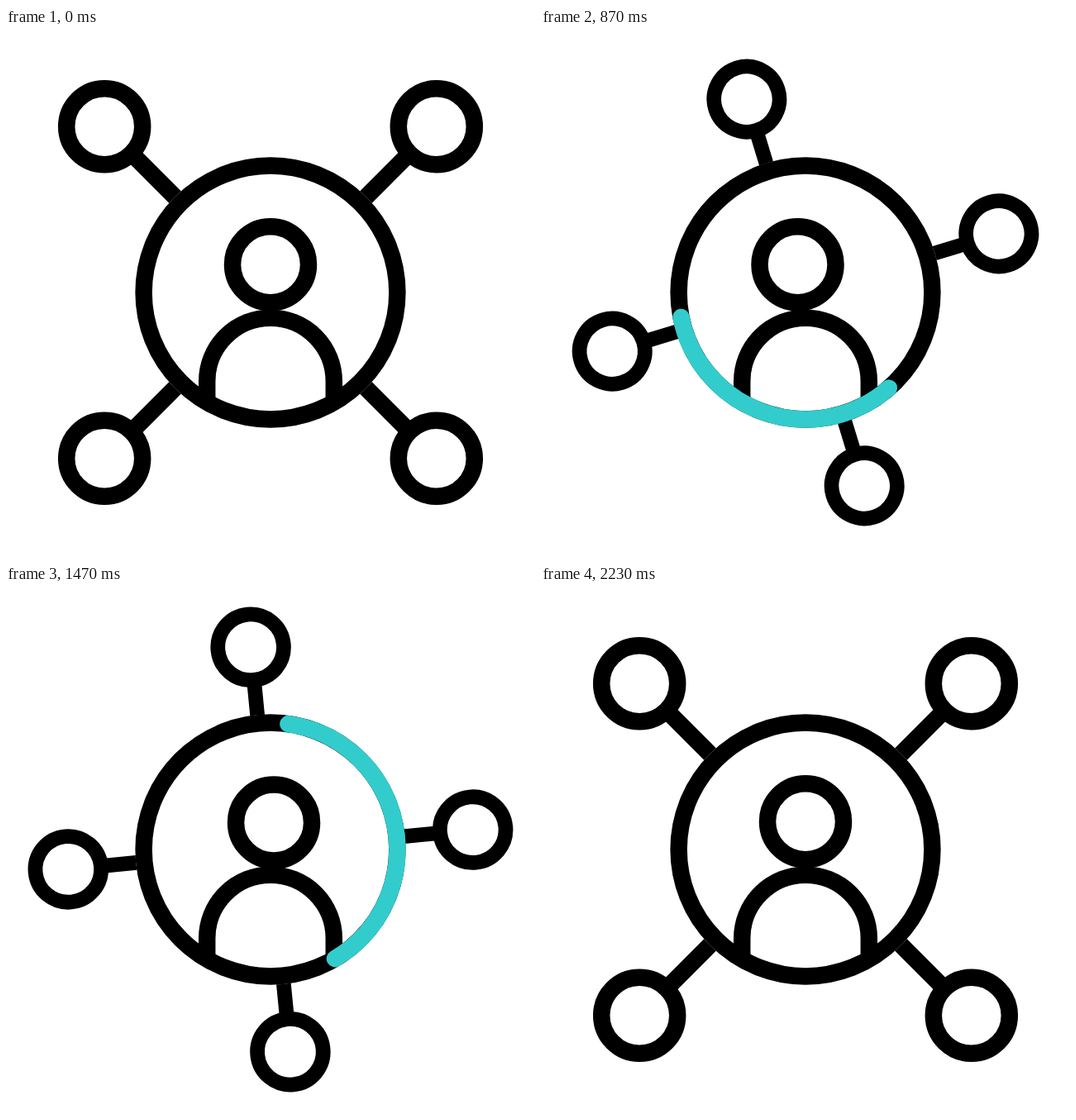
These frames come from a looping animation (640x640 px, 2.5 s). An HTML page:

```html
<!DOCTYPE html>
<html lang="en">
<head>
<meta charset="utf-8">
<title>Network hub</title>
<style>
  html, body { margin: 0; width: 100%; height: 100%; overflow: hidden; background: #fff; }
  svg { display: block; width: 100%; height: 100%; fill: none; stroke: #000; stroke-width: 20.5; }
</style>
</head>
<body>
<svg viewBox="-320 -320 640 640">
  <defs>
    <g id="arm">
      <path d="M150 0H238.5"/>
      <circle cx="284" r="46"/>
    </g>
  </defs>
  <g id="arms">
    <use href="#arm" transform="rotate(45)"/>
    <use href="#arm" transform="rotate(135)"/>
    <use href="#arm" transform="rotate(225)"/>
    <use href="#arm" transform="rotate(315)"/>
  </g>
  <circle r="163.6" fill="#fff" stroke="none"/>
  <path d="M-76.8 133V107.5A76.8 76.8 0 0 1 76.8 107.5V133"/>
  <circle id="head" cy="-33.8" r="46"/>
  <circle r="153.4"/>
  <path id="sweep" stroke="#3cc" stroke-linecap="round"/>
</svg>
<script>
const LOOP = 2500, FPS = 30, RADIUS = 153.4;
const SWEEP_FROM = 15.5, SWEEP_TURN = 472.5;
const arms = document.getElementById("arms");
const head = document.getElementById("head");
const sweep = document.getElementById("sweep");

// Cubic-bezier(x1, 0, x2, 1), solved by bisection
function ease(u, x1, x2) {
  let lo = 0, hi = 1;
  for (let i = 0; i < 30; i++) {
    const p = (lo + hi) / 2, q = 1 - p;
    const x = 3 * q * q * p * x1 + 3 * q * p * p * x2 + p * p * p;
    if (x < u) lo = p; else hi = p;
  }
  return lo * lo * (3 - 2 * lo);
}

// 0 before step a, 1 after step b
function ramp(k, a, b, x1 = 0.53, x2 = 0.47) {
  if (k <= a) return 0;
  if (k >= b) return 1;
  return ease((k - a) / (b - a), x1, x2);
}

// Rises from a to b and falls back by c
const bump = (k, a, b, c) => ramp(k, a, b) - ramp(k, b, c);

function point(deg) {
  const r = deg * Math.PI / 180;
  return `${(RADIUS * Math.cos(r)).toFixed(2)} ${(RADIUS * Math.sin(r)).toFixed(2)}`;
}

function arc(from, to) {
  if (to - from < 0.3) return "";
  const large = to - from > 180 ? 1 : 0;
  return `M${point(from)}A${RADIUS} ${RADIUS} 0 ${large} 1 ${point(to)}`;
}

function draw(ms) {
  // Steps change on whole hundredths of a second.
  const k = Math.floor((Math.floor(ms / 10) * 10 + 5) * FPS / 1000);

  const turn = 180 * ramp(k, 8, 67);
  const size = 1 - 0.15 * (ramp(k, 8, 31) - ramp(k, 36, 67));
  arms.setAttribute("transform", `rotate(${turn}) scale(${size})`);

  const right = bump(k, 40, 49, 58);
  const x = 10.5 * right - 9.5 * bump(k, 14, 26, 40);
  const y = 3.4 * bump(k, 26, 40, 49) - 2.2 * right;
  head.setAttribute("transform", `translate(${x} ${y})`);

  const lead = ramp(k, 12.4, 52.7, 0.167, 0.777);
  const trail = ramp(k, 16.5, 61, 0.465, 0.755);
  sweep.setAttribute("d", arc(SWEEP_FROM + SWEEP_TURN * trail, SWEEP_FROM + SWEEP_TURN * lead));
}

const start = performance.now();
function tick() {
  draw((performance.now() - start) % LOOP);
  requestAnimationFrame(tick);
}
tick();
</script>
</body>
</html>
```
